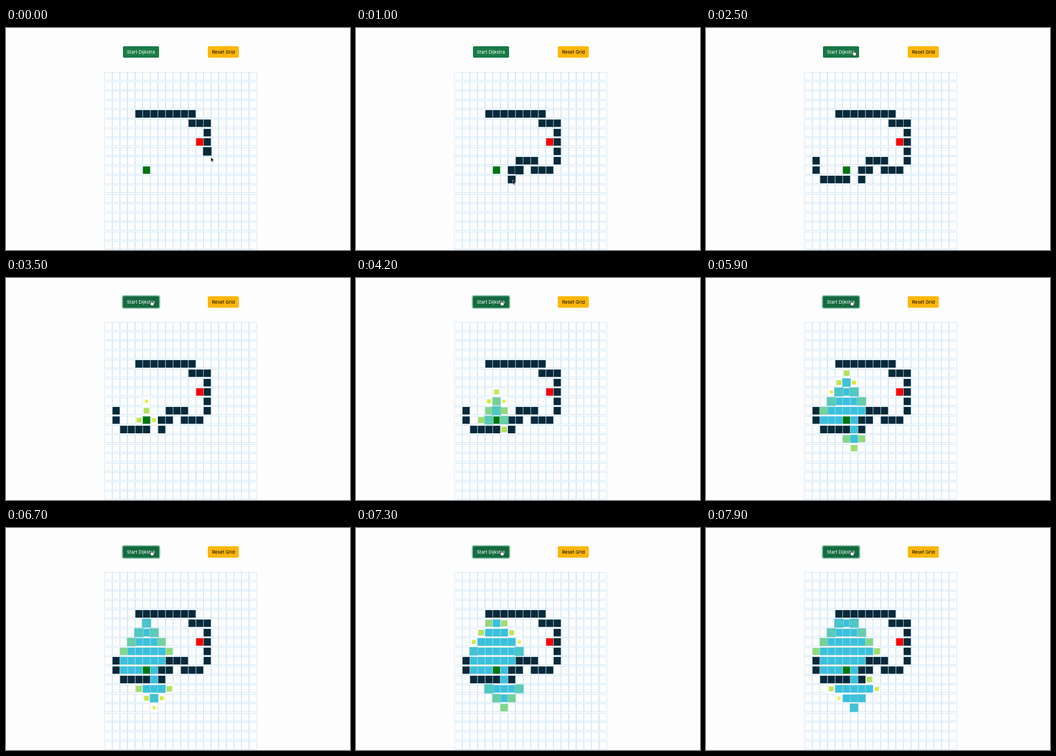
Animation, 600 px wide and 389 px high, one loop 8000 ms. Source, as an HTML page with a canvas:

```html
<!DOCTYPE html>
<html lang="en">
<head>
<meta charset="utf-8">
<title>Dijkstra grid</title>
<style>
  html, body { margin: 0; width: 100%; height: 100%; overflow: hidden; background: #fdfdfd; }
  canvas, .btn, .cursor { position: absolute; }
  canvas { left: 0; top: 0; width: 600px; height: 389px; }
  .btn {
    top: 31.7px; height: 20.1px; border-radius: 2px;
    font: 400 8.1px/20.4px Inter, "Liberation Sans", sans-serif;
    text-align: center; white-space: nowrap;
  }
  .start { left: 203.5px; width: 63.5px; color: #fff; background: #197b47; animation: press 8s linear infinite; }
  .reset { left: 352px; width: 54.4px; color: #000; background: #ffb608; }
  .cursor { left: 0; top: 0; width: 12px; height: 14px; overflow: visible; animation: move 8s linear infinite; }
  .arrow { animation: arrow 8s step-end infinite; }
  .hand { animation: hand 8s step-end infinite; }

  @keyframes press {
    0%, 30% { background: #197b47; box-shadow: 0 0 0 0 #19875400; }
    31.5%, 37% { background: #177544; box-shadow: 0 0 0 0 #19875400; }
    38.8%, 100% { background: #156b40; box-shadow: 0 0 0 2.1px #19875480; }
  }
  @keyframes arrow { 0% { opacity: 1; } 30.2% { opacity: 0; } }
  @keyframes hand { 0% { opacity: 0; } 30.2% { opacity: 1; } }
  @keyframes move {
    0% { transform: translate(357px, 226px); }
    0.8% { transform: translate(355px, 229px); }
    1.9% { transform: translate(347px, 238px); }
    2.8% { transform: translate(341px, 247px); }
    3.8% { transform: translate(329px, 250px); }
    4.9% { transform: translate(316px, 249px); }
    6.1% { transform: translate(309px, 238px); }
    7.4% { transform: translate(300px, 235px); }
    8.8% { transform: translate(288px, 237px); }
    10.2% { transform: translate(284px, 246px); }
    11.2% { transform: translate(279px, 252px); }
    12.5% { transform: translate(273px, 266px); }
    13.7% { transform: translate(266px, 271.5px); }
    14.5% { transform: translate(257px, 272px); }
    15% { transform: translate(250px, 269px); }
    16.8% { transform: translate(237px, 266px); }
    18.6% { transform: translate(224px, 267px); }
    20.4% { transform: translate(210px, 264px); }
    21.8% { transform: translate(197px, 253px); }
    23.3% { transform: translate(193px, 237px); }
    24.3% { transform: translate(194px, 232px); animation-timing-function: ease-in-out; }
    30.6%, 33.5% { transform: translate(256px, 40px); }
    36%, 100% { transform: translate(252px, 40px); }
  }
</style>
</head>
<body>
<canvas id="grid"></canvas>
<div class="btn start">Start Dijkstra</div>
<div class="btn reset">Reset Grid</div>
<svg class="cursor" viewBox="0 0 12 14">
  <path class="arrow" d="M.3 .2V8.2L2.1 6.5 3.4 9.4 4.7 8.8 3.4 6H5.8Z" fill="#000" stroke="#fff" stroke-width=".6"/>
  <path class="hand" d="M0 .8Q.6-.5 1.4 .6L2.2 3Q3-.1 3.5 2.9 4.3 2.2 4.8 3.2 5.8 2.8 6 4.2L6.1 6 5.3 8.7H1.8L-.9 5.4Q-1 4.3 .6 4.8Z" fill="#fff" stroke="#111" stroke-width=".65"/>
</svg>
<script>
const LOOP = 8000, COLS = 20, ROWS = 19;
const SIZE = 13.25, PITCH = 16.43, LEFT = 172.2, TOP = 78.1, LINE = 0.53;
const WALL = '#0a2938', YELLOW = [245, 246, 8], CYAN = [57, 193, 220];
const WALL_MS = 300, VISIT_MS = 1500;
const id = (c, r) => r * COLS + c;
const START = id(5, 10), TARGET = id(12, 7);

const cells = Array.from({ length: COLS * ROWS }, () => ({}));
const wall = (c, r, at = -9999) => { cells[id(c, r)] = { wall: true, at }; };

for (let c = 4; c < 12; c++) wall(c, 4);
for (let c = 11; c < 14; c++) wall(c, 5);
wall(13, 6);
wall(13, 7);
// column, row, time drawn
[
  [13, 8, -120], [13, 9, 60], [12, 10, 200], [11, 10, 290], [10, 10, 380],
  [10, 9, 480], [9, 9, 580], [8, 9, 690], [8, 10, 820], [7, 10, 903], [7, 11, 903],
  [5, 11, 1200], [4, 11, 1340], [3, 11, 1490], [2, 11, 1630], [1, 10, 1740], [1, 9, 1860]
].forEach(w => wall(...w));
cells[START] = { fill: '#00750a' };
cells[TARGET] = { fill: '#f00' };

// Visit by distance, then in reading order, one cell every 100 ms
const seen = new Set([START]);
let level = [START], at = 3150;
while (at < LOOP) {
  const next = new Set();
  for (const i of level)
    for (const step of [-COLS, -1, 1, COLS])
      if (!seen.has(i + step) && !cells[i + step].wall) next.add(i + step);
  level = [...next].sort((a, b) => a - b);
  for (const i of level) {
    seen.add(i);
    cells[i].at = at;
    at += 100;
  }
}

// cubic-bezier(0, 0, .58, 1)
function easeOut(x) {
  let lo = 0, hi = 1;
  for (let n = 0; n < 20; n++) {
    const s = (lo + hi) / 2;
    if (1.74 * s * s * (1 - s) + s ** 3 < x) lo = s; else hi = s;
  }
  return lo * lo * (3 - 2 * lo);
}
const mix = (a, b, k) => a + (b - a) * k;
const pop = (p, peak) => p < peak
  ? mix(0.3, 1.2, easeOut(p / peak))
  : mix(1.2, 1, easeOut((p - peak) / (1 - peak)));

function look(cell, t) {
  if (cell.fill) return { fill: cell.fill };
  if (!(t >= cell.at)) return {};
  const p = (t - cell.at) / (cell.wall ? WALL_MS : VISIT_MS);
  if (cell.wall) return { fill: WALL, scale: p < 1 && pop(p, 0.5) };
  const k = p < 1 ? easeOut(p) : 1;
  return {
    fill: `rgb(${YELLOW.map((v, i) => Math.round(mix(v, CYAN[i], k)))})`,
    scale: p < 1 && pop(p, 0.75)
  };
}

const canvas = document.getElementById('grid');
const ctx = canvas.getContext('2d');
const dpr = window.devicePixelRatio || 1;
canvas.width = 600 * dpr;
canvas.height = 389 * dpr;

const corner = i => [LEFT + (i % COLS) * SIZE, TOP + Math.floor(i / COLS) * PITCH];
const outline = (x, y) => ctx.strokeRect(x - LINE / 2, y - LINE / 2, SIZE + LINE, SIZE + LINE);
function paint(fill, x, y) {
  ctx.fillStyle = fill;
  ctx.fillRect(x, y, SIZE, SIZE);
}

function draw(t) {
  const looks = cells.map(cell => look(cell, t));
  ctx.setTransform(dpr, 0, 0, dpr, 0, 0);
  ctx.clearRect(0, 0, 600, 389);
  ctx.strokeStyle = 'rgb(172, 213, 242)';
  ctx.lineWidth = LINE;
  looks.forEach((l, i) => { if (l.fill && !l.scale) paint(l.fill, ...corner(i)); });
  looks.forEach((l, i) => { if (!l.scale) outline(...corner(i)); });
  looks.forEach((l, i) => {
    if (!l.scale) return;
    const [x, y] = corner(i), half = SIZE / 2;
    ctx.save();
    ctx.translate(x + half, y + half);
    ctx.scale(l.scale, l.scale);
    paint(l.fill, -half, -half);
    outline(-half, -half);
    ctx.restore();
  });
}

let first;
function tick(now) {
  first ??= now;
  draw((now - first) % LOOP);
  requestAnimationFrame(tick);
}
draw(0);
requestAnimationFrame(tick);
</script>
</body>
</html>
```
